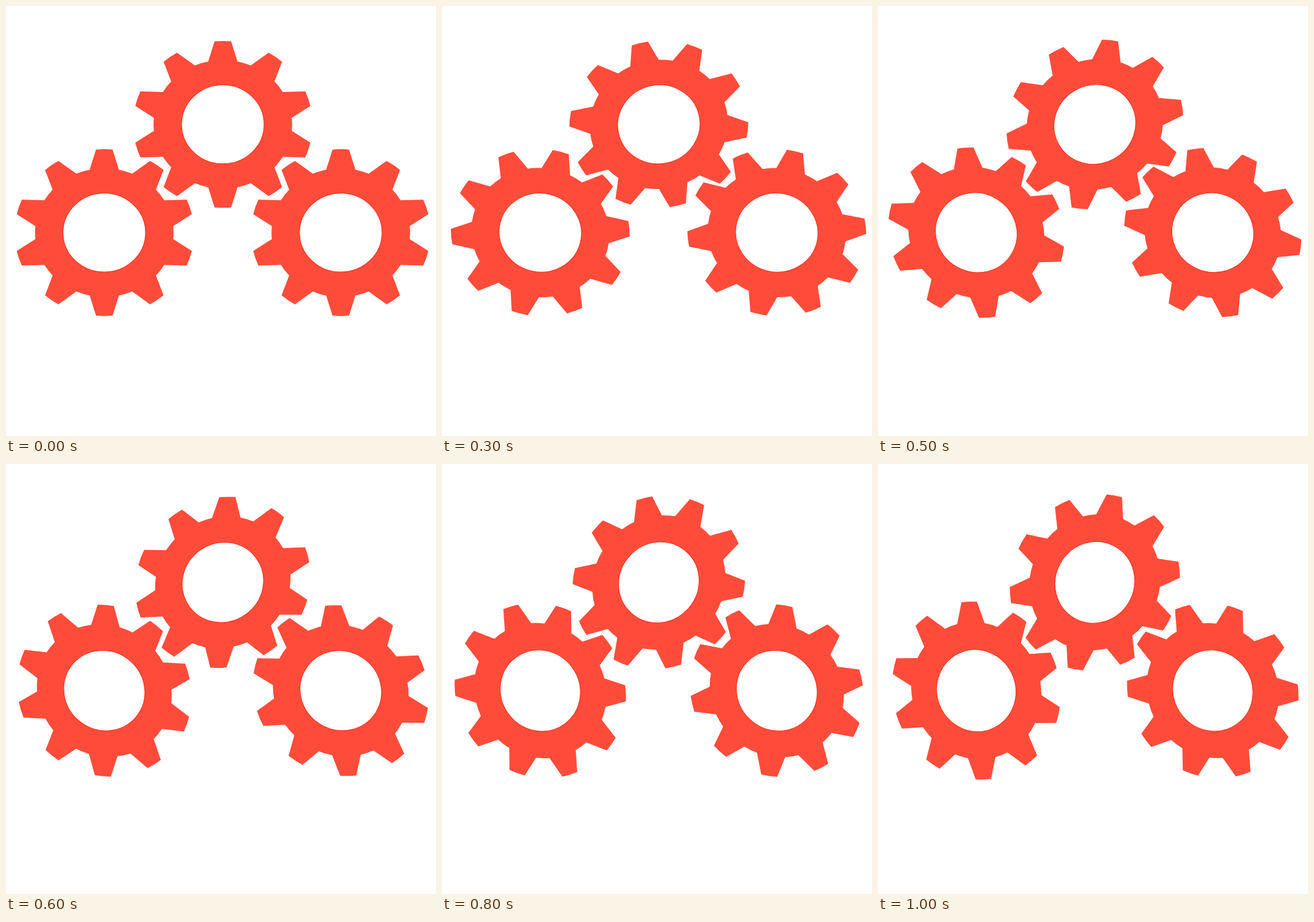
An HTML page that plays this animation: 700 px wide and 700 px high, repeating every 1.1 s.

```html
<!DOCTYPE html>
<html lang="en">
<head>
<meta charset="utf-8">
<title>Turning gears</title>
<style>
  html, body { margin: 0; width: 100%; height: 100%; overflow: hidden; background: #fff; }
  svg { display: block; width: 100%; height: 100%; }
</style>
</head>
<body>
<svg id="stage" viewBox="0 0 700 700"></svg>
<script>
const NS = "http://www.w3.org/2000/svg";
const STEP = 100;
const STEPS = 11;
const TEETH = 10;
const STRETCH = 1.076; // gears are slightly wider than tall at rest
const TIP = { r: 135.8, half: 5.3 };
const ROOT = { r: 104.8, half: 12.2 };

// Speed changes at these steps; each gear lists its angle there
const KEYS = [0, 3, 6, 10];
const gears = [
  { x: 353, y: 192.7, angles: [0, -13.2, -35, -60.5] },
  { x: 160, y: 368.9, angles: [0, 14.3, 39, 68.6] },
  { x: 545, y: 368.9, angles: [0, 12.7, 33, 53.2] }
];

function make(tag, attrs, parent) {
  const el = document.createElementNS(NS, tag);
  for (const key in attrs) el.setAttribute(key, attrs[key]);
  return parent.appendChild(el);
}

function point(r, deg) {
  const a = deg * Math.PI / 180;
  return (r * STRETCH * Math.sin(a)).toFixed(2) + " " + (-r * Math.cos(a)).toFixed(2);
}

function arc(r, deg) {
  return `A${r * STRETCH} ${r} 0 0 1 ${point(r, deg)}`;
}

function gearPath() {
  let d = "M" + point(ROOT.r, -ROOT.half);
  for (let i = 0; i < TEETH; i++) {
    const mid = i * 360 / TEETH;
    d += arc(ROOT.r, mid - ROOT.half);
    d += "L" + point(TIP.r, mid - TIP.half) + arc(TIP.r, mid + TIP.half);
    d += "L" + point(ROOT.r, mid + ROOT.half);
  }
  return d + arc(ROOT.r, 360 - ROOT.half) + "Z";
}

function angleAt(step, angles) {
  const k = Math.max(1, KEYS.findIndex(key => key >= step));
  const part = (step - KEYS[k - 1]) / (KEYS[k] - KEYS[k - 1]);
  return angles[k - 1] + (angles[k] - angles[k - 1]) * part;
}

const stage = document.getElementById("stage");
const outline = gearPath();
for (const gear of gears) {
  gear.el = make("g", {}, stage);
  make("path", { d: outline, fill: "#ff4c3a" }, gear.el);
  make("ellipse", { rx: 67.2, ry: 64.2, fill: "#fff", stroke: "#fc3424", "stroke-width": 1.2 }, gear.el);
}

const start = performance.now();

function draw(now) {
  const step = Math.floor(Math.max(0, now - start) / STEP) % STEPS;
  for (const { el, x, y, angles } of gears) {
    el.setAttribute("transform", `translate(${x} ${y}) rotate(${angleAt(step, angles)})`);
  }
  requestAnimationFrame(draw);
}
draw(start);
</script>
</body>
</html>
```
